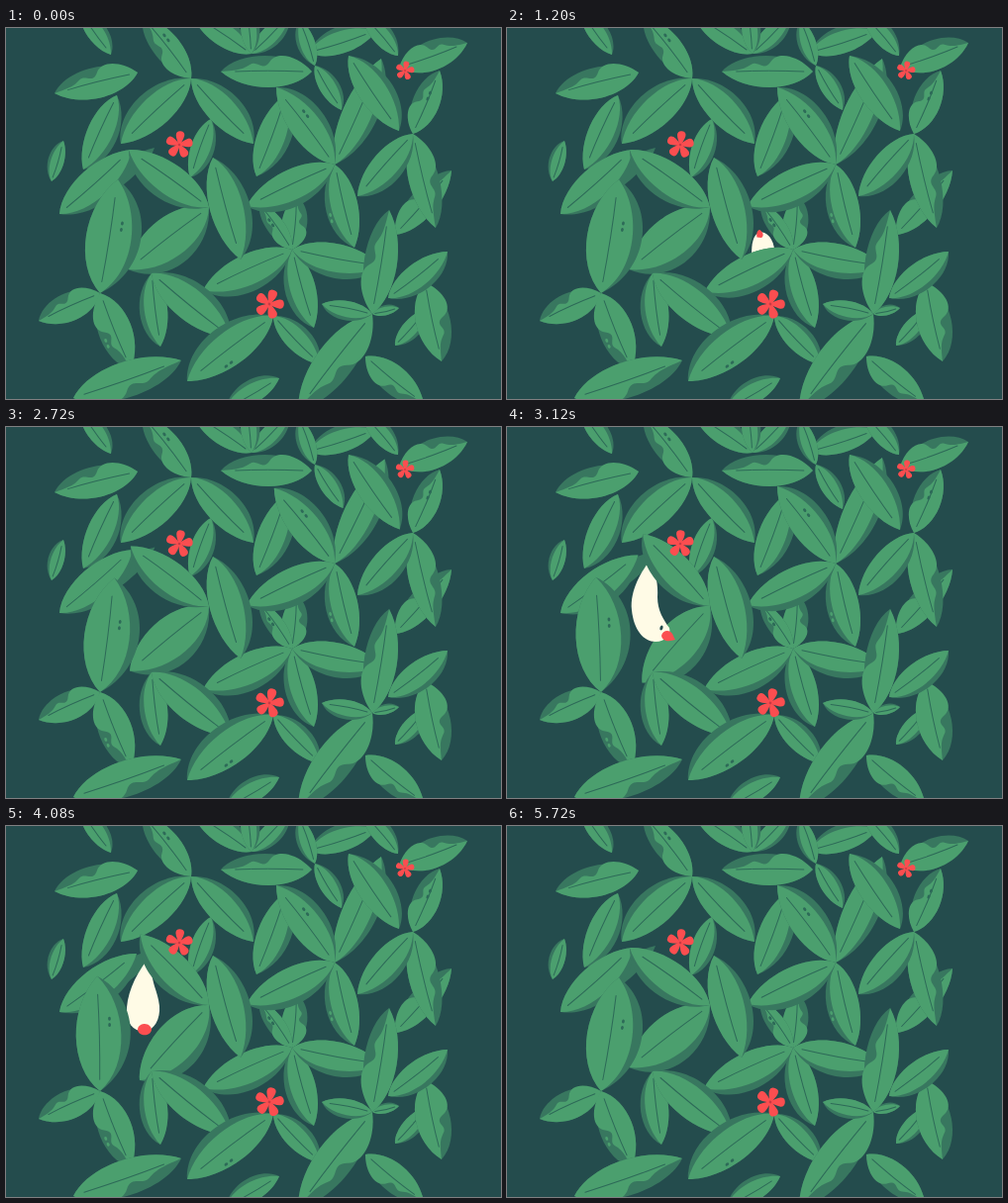
An HTML page that plays this animation: 500 px wide and 375 px high, repeating every 5.76 s.

```html
<!DOCTYPE html>
<html lang="en">
<head>
<meta charset="utf-8">
<title>Peeking through leaves</title>
<style>
html, body { margin: 0; width: 100%; height: 100%; overflow: hidden; background: #244c4d; }
svg { display: block; width: 100vw; height: 100vh; }
</style>
</head>
<body>
<svg id="stage" viewBox="0 0 500 375"></svg>
<script>
const NS = 'http://www.w3.org/2000/svg';
const stage = document.getElementById('stage');
const LOOP = 5760, STEP = 40;
const LIGHT = '#4b9f6e', DARK = '#38775f', VEIN = '#2d6a58', RED = '#fb4e50', CREAM = '#fffbe6', INK = '#244c4d';
const leaves = [], flowers = [];

function add(tag, attrs, parent = stage) {
  const el = document.createElementNS(NS, tag);
  for (const k in attrs) el.setAttribute(k, attrs[k]);
  parent.appendChild(el);
  return el;
}

const ease = x => { x = Math.min(1, Math.max(0, x)); return x * x * (3 - 2 * x); };
const ramp = (t, a, b) => ease((t - a) / (b - a));
const pulse = (t, a, b, c, d) => ramp(t, a, b) - ramp(t, c, d);

// One side of a leaf along the x axis; w is the signed bulge.
const side = (len, w, near = .22, far = .73) =>
  `M0 0C${len * near} ${w * 1.36} ${len * far} ${w * 1.34} ${len} 0Z`;

// A side whose light part runs out in two lobes.
const lobes = (len, w) =>
  `M0 0C${len * .15} ${w} ${len * .38} ${w * 1.35} ${len * .46} ${w * .65}S${len * .6} ${w * .75} ${len * .68} ${w * .45}S${len * .8} ${w * .1} ${len} 0Z`;

// All leaves growing from one point. Width follows length;
// shade is the dark side: 1 right, -1 left, 0 wholly dark.
function plant(x, y) {
  return (tx, ty, shade = 1, { wavy, fat = 1, spot, on, turn = 0 } = {}) => {
    const len = Math.hypot(tx - x, ty - y);
    const angle = Math.atan2(ty - y, tx - x) * 180 / Math.PI;
    const w = len * .155 * fat, s = shade || 1;
    const g = add('g', {});
    add('path', { d: side(len, -s * w) + side(len, s * w * (wavy ? 1 : 1.42), .25, .8), fill: DARK }, g);
    if (shade) {
      add('path', { d: side(len, -s * w) + (wavy ? lobes : side)(len, s * w), fill: LIGHT }, g);
      add('path', { d: `M${len * .1} 0Q${len * .5} 1.5 ${len * .84} 0`, fill: 'none', stroke: VEIN, 'stroke-linecap': 'round' }, g);
    }
    if (spot !== undefined) for (const i of [-1, 1])
      add('ellipse', { cx: len * .6 + i * 3.2, cy: w * spot, rx: 2, ry: 1.4, fill: spot * s > .6 ? LIGHT : VEIN }, g);
    leaves.push({ g, x, y, angle, on, turn });
  };
}

function flower(x, y, r, rot) {
  const g = add('g', {});
  for (let i = 0; i < 5; i++)
    add('path', {
      d: `M0 0C${-r * .1} ${-r * .3} ${-r * .55} ${-r} 0 ${-r}S${r * .1} ${-r * .3} 0 0Z`,
      fill: RED, stroke: RED, 'stroke-width': r * .12, transform: `rotate(${i * 72})`
    }, g);
  add('circle', { r: r * .1, fill: '#c93a45' }, g);
  flowers.push({ g, x, y, rot });
}

const bird = () => add('g', {});
const wavy = true;

// Top edge and left side
const top1 = plant(248, 26), top2 = plant(187, 51);
plant(75, -17)(106, 27, -1);
top2(138, -12, -1, { wavy, fat: 1.1, spot: .4 });
top1(188, -14);
top1(286, -13);
top1(242, -24);
plant(306, 25)(374, 3, -1);
plant(396, 28)(360, -14);
plant(397, 40)(466, 15, -1, { wavy, fat: 1.3 });
plant(133, 45)(49, 66, 1, { wavy, fat: 1.15 });
plant(112, 68)(78, 143, -1);
plant(46, 155)(58, 114, -1);
plant(207, 92)(186, 151, -1);
top2(250, 117, -1);
top2(116, 117);
plant(309, 44)(217, 44, 1, { wavy, fat: 1.1 });

// Upper right
const right = plant(411, 107), upper = plant(332, 138);
plant(312, 38)(297, -8, -1);
plant(312, 38)(339, 83, -1, { on: 'b', turn: -16 });
plant(253, 150)(284, 66, 1, { on: 'b', turn: 4 });
upper(379, 31, 1, { fat: .8, on: 'b', turn: 16 });
plant(346, 28)(397, 104, -1, { on: 'b', turn: -5 });
plant(393, 209)(450, 144, -1, { wavy });
right(434, 202, -1, { wavy });
right(438, 43, -1, { wavy, fat: 1.25, spot: 0 });
right(355, 170, -1);

// Middle
const mid = plant(289, 224);
mid(294, 170, 1, { wavy, fat: 1.5 });
mid(311, 303);
mid(256, 177, -1, { wavy, spot: -.2, on: 'a', turn: 10 });
const birdA = bird();
mid(199, 265, -1, { on: 'a', turn: -20 });
mid(379, 241);
const birdB = bird();
upper(352, 222, 1, { spot: 1.2 });
upper(273, 60, 1, { spot: .5, on: 'b', turn: -14 });
upper(243, 180, -1);

// Left
const low = plant(95, 268), joint = plant(205, 181), far = plant(54, 188);
plant(209, 131)(237, 234, -1);
far(150, 121, 0, { fat: .5, on: 'c', turn: 2 });
far(127, 123, 1, { on: 'c', turn: 5 });
joint(123, 244, -1, { fat: 1.25, on: 'c', turn: -11 });
const birdC = bird();
joint(124, 123, -1, { on: 'c', turn: 11.5 });
low(33, 296, 1, { wavy, fat: 1.35 });
low(126, 345, 1, { wavy, fat: 1.3, spot: .75 });
low(113, 153, 1, { fat: 1.25, spot: .5, on: 'c', turn: -11.5 });

// Bottom
const birdD = bird(), stem = plant(147, 248), base = plant(270, 291);
stem(156, 322, 1, { on: 'd', turn: 18 });
stem(227, 313, -1, { on: 'd', turn: -10 });
plant(68, 374)(177, 336, 1, { wavy });
base(317, 340, -1);
base(183, 357, 1, { spot: -.7 });
plant(222, 385)(276, 354, -1);

// Lower right
const corner = plant(370, 289);
plant(363, 332)(422, 380, 1, { wavy, fat: 1.2 });
corner(295, 385, -1, { wavy });
plant(393, 321)(425, 284);
plant(423, 257)(440, 337, -1, { wavy, fat: 1.35 });
plant(386, 273)(446, 226);
corner(397, 283, -1);
corner(387, 184, -1, { wavy });
corner(319, 279, -1);

flower(175, 118, 13, 6);
flower(266, 279, 14, 15);
flower(403, 43, 9, 8);

// Creatures
add('path', { d: 'M249 244C246 220 249 209 257 208C266 209 270 219 270 230V244Z', fill: CREAM }, birdA);
add('path', { d: 'M253 213C252 209 254 205 256 206C259 208 260 212 257 213.5Z', fill: RED }, birdA);

add('path', { d: 'M306 126C310 98 326 86 342 87C354 88 359 97 354 104C347 107 337 107 333 114Q330 121 330 134Z', fill: CREAM }, birdB);
add('path', { d: 'M347 100C347 94 355 94 359 97Q363 100 359 103C354 106 347 106 347 100Z', fill: RED }, birdB);
add('path', { d: 'M343.5 95q2.5-3 5 0', fill: 'none', stroke: INK, 'stroke-width': 1.3, 'stroke-linecap': 'round' }, birdB);

const SIDE = 'M146 133C136 145 124 165 126 185C128 205 138 217 150 217C160 217 166 210 164 203C158 195 152 185 152 172C153 160 150 148 146 133Z';
const FRONT = 'M142 136C130 152 121 172 122 190C123 203 133 208 140 208C150 206 156 195 155 182C154 174 152 168 150 162C148 155 147 147 142 136Z';
const BEAK_SIDE = 'M156 211C157 206 162 205 165 207C168 209 168 212 170 215C164 217 157 217 156 211Z';
const BEAK_FRONT = 'M133 206C133 201 138 200 140 200C144 200 147 203 147 206C146 213 134 213 133 206Z';
const bodyC = add('path', { fill: CREAM }, birdC);
const eyeC = add('ellipse', { rx: 1.5, ry: 2.5, fill: INK }, birdC);
const beakC = add('path', { fill: RED }, birdC);

add('path', { d: 'M166 280C164 297 167 303 160 313C153 322 152 334 159 338L175 349Q180 351 183 346C188 339 197 334 197 325C196 312 188 308 187 297L190 280Z', fill: RED }, birdD);
add('path', { d: 'M157 336C165 328 178 328 182 337C178 340 175 344 175 349L163 345Z', fill: '#c83d48' }, birdD);
add('ellipse', { rx: 2.4, ry: 4.2, fill: CREAM, transform: 'translate(164 318) rotate(28)' }, birdD);

function morph(from, to, k) {
  const nums = to.match(/[\d.]+/g);
  let i = 0;
  return from.replace(/[\d.]+/g, n => (+n + (nums[i++] - n) * k).toFixed(1));
}

function pop(g, x, y, s, rot = 0) {
  g.setAttribute('display', s < .02 ? 'none' : 'inline');
  g.setAttribute('transform', `translate(${x} ${y}) rotate(${rot}) scale(${s}) translate(${-x} ${-y})`);
}

function draw(t) {
  const open = {
    a: pulse(t, 120, 400, 940, 1240),
    b: pulse(t, 1320, 1640, 2500, 2780),
    c: pulse(t, 2640, 2960, 4030, 4280),
    d: pulse(t, 4290, 4540, 5360, 5560)
  };
  const u = Math.min(1, Math.max(0, (t - 5360) / 360));
  const shake = 1.5 * Math.sin(u * Math.PI * 4) * (1 - u);
  leaves.forEach((l, i) => {
    const rot = l.angle + (l.on ? open[l.on] * l.turn : 0) + shake * (i % 2 ? 1 : -1);
    l.g.setAttribute('transform', `translate(${l.x} ${l.y}) rotate(${rot.toFixed(2)})`);
  });

  const still = Math.min(t, 4560);
  flowers.forEach((f, i) => {
    const rot = f.rot + 4 * Math.sin(still / 1140 * Math.PI * 2 + i);
    f.g.setAttribute('transform', `translate(${f.x} ${f.y}) rotate(${rot.toFixed(2)})`);
  });

  pop(birdA, 262, 240, 1.25 * pulse(t, 180, 480, 1160, 1320), 8 * pulse(t, 560, 700, 860, 1000));
  pop(birdB, 314, 114, pulse(t, 1400, 1720, 2480, 2680), 5 * pulse(t, 2080, 2200, 2320, 2440));
  pop(birdC, 160, 150, pulse(t, 2700, 3000, 4090, 4250));
  pop(birdD, 180, 294, pulse(t, 4340, 4550, 5360, 5500));

  const front = ramp(t, 3400, 3640);
  bodyC.setAttribute('d', morph(SIDE, FRONT, front));
  beakC.setAttribute('d', morph(BEAK_SIDE, BEAK_FRONT, front));
  eyeC.setAttribute('transform', `translate(${156 - 14 * front} ${203 - 4 * front}) rotate(20)`);
  eyeC.setAttribute('opacity', front > .6 ? 0 : 1);
}

const start = performance.now();
function tick() {
  const t = (performance.now() - start) % LOOP;
  draw(Math.floor(t / STEP) * STEP);
  requestAnimationFrame(tick);
}
tick();
</script>
</body>
</html>
```
